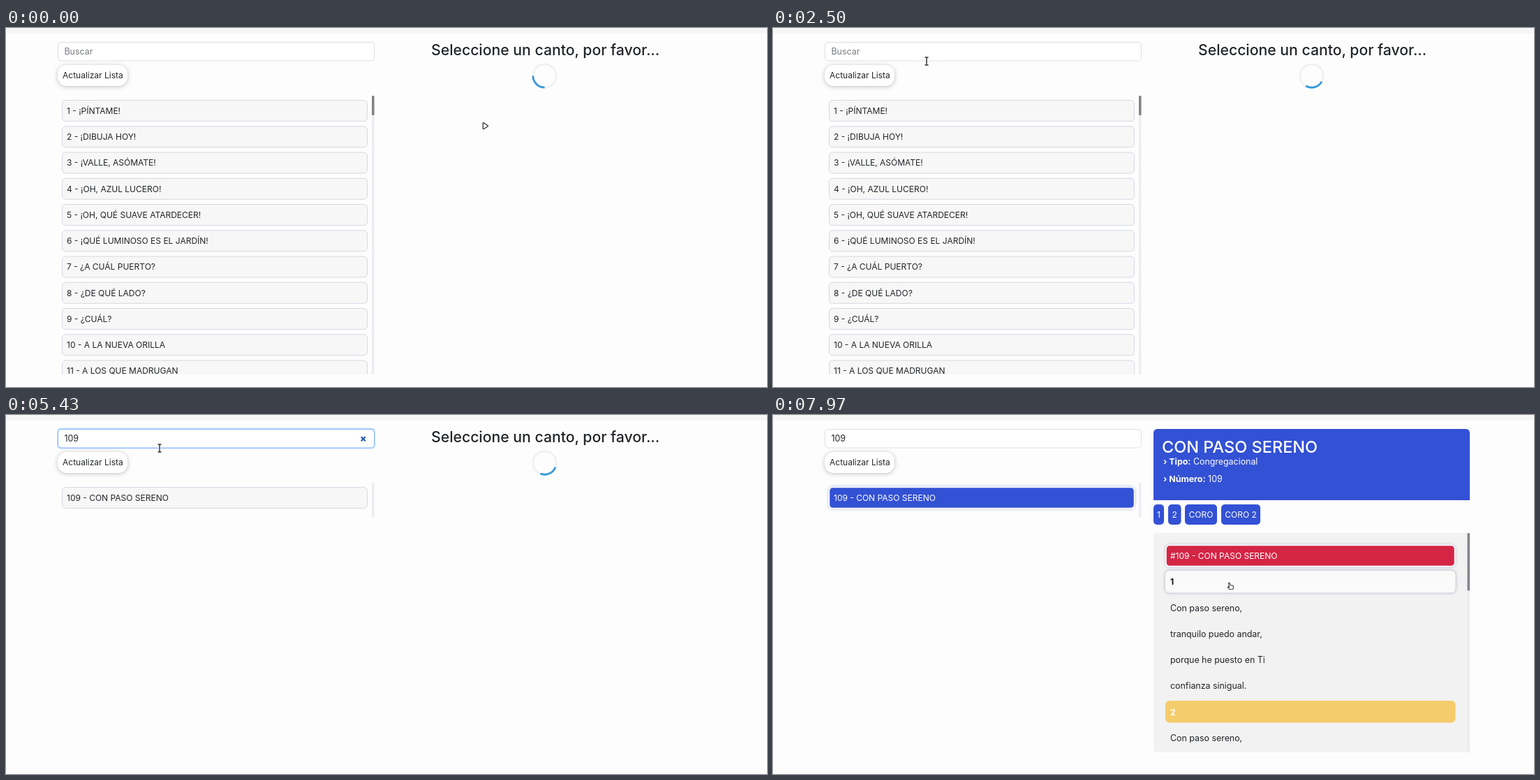
An HTML page for the animation above (8 s loop, 1090 px wide and 514 px high).

```html
<!DOCTYPE html>
<html lang="es">
<head>
<meta charset="utf-8">
<title>Cantos</title>
<style>
  html, body { margin: 0; width: 100%; height: 100%; overflow: hidden; background: #fdfdfd; }
  svg { display: block; width: 1090px; height: 514px; }
  text { font-family: Inter, "Open Sans", sans-serif; font-size: 12px; fill: #212529; white-space: pre; }
  .body { font-size: 12.4px; }
  .white { fill: #fff; }
  .bold { font-weight: 700; }
  .blue { fill: #3351d4; }
  .item { fill: #f7f7f7; stroke: #d6d8e4; }
  .pill { filter: drop-shadow(0 1px 3px rgba(0, 0, 0, .25)); }
  .soft { filter: drop-shadow(0 0 2px rgba(60, 70, 150, .3)); }
</style>
</head>
<body>
<svg viewBox="0 0 1090 514">
  <defs>
    <clipPath id="listClip"><rect id="listBox" x="70" y="97" width="452" height="399"/></clipPath>
    <clipPath id="songClip"><rect x="545" y="169" width="453" height="314"/></clipPath>
  </defs>
  <rect width="1090" height="514" fill="#fdfdfd"/>
  <rect width="1090" height="8" fill="#f6f6f7"/>

  <rect id="glow" x="73" y="18.5" width="456" height="30" rx="5.5" fill="#c2dcfb"/>
  <rect id="field" x="74.5" y="20.5" width="453" height="26.5" rx="4.5" fill="#fff"/>
  <text id="query" class="body" x="83.5" y="38"></text>
  <path id="caret" d="M84.5 27V41" stroke="#333" stroke-width="1"/>
  <path id="clear" d="M508.7 31.2l6 6m0-6l-6 6" stroke="#1b57a3" stroke-width="2"/>

  <rect class="pill" x="74" y="53" width="100" height="30" rx="13" fill="#fff"/>
  <text x="81" y="72.3">Actualizar Lista</text>

  <g id="list" clip-path="url(#listClip)"></g>
  <rect id="track" x="524" y="97" width="3.5" height="399" fill="#ededf3"/>
  <rect id="thumb" x="524" y="97" width="3.5" height="28" rx="1" fill="#828282"/>

  <g id="wait">
    <text x="609" y="39" style="font-size:21.2px;font-weight:500">Seleccione un canto, por favor...</text>
    <circle cx="771.5" cy="68.5" r="16.7" fill="none" stroke="#f1f1f2" stroke-width="2.8"/>
    <path id="arc" d="M759.7 56.7A16.7 16.7 0 0 1 783.3 56.7" fill="none" stroke="#3498db" stroke-width="2.8"/>
  </g>

  <g id="song"></g>

  <g id="cursor">
    <path id="arrow" d="M1.2 1.2L1.2 9Q1.3 10 2.3 9.5L8 6Q8.8 5.3 8 4.7L2.5 .8Q1.3 .2 1.2 1.2Z" fill="#fff" stroke="#333" stroke-width="1.3" stroke-linejoin="round"/>
    <g id="beam" fill="none">
      <path d="M-2.5 -5H2.5M0 -5V6M-2.5 6H2.5" stroke="#fff" stroke-width="3.4"/>
      <path d="M-2.5 -5H2.5M0 -5V6M-2.5 6H2.5" stroke="#333" stroke-width="1.5"/>
    </g>
    <path id="hand" d="M-2.6 -4.3Q-1.7 -5.6 -.8 -4.3L.1 -1.2L3.2 -.7Q4.6 -.3 4.5 1L4 4.5L-.6 4.8L-3.6 1.9Q-3.9 .7 -2.5 .9L-1.4 1.5Z" fill="#fff" stroke="#333" stroke-width="1.1" stroke-linejoin="round"/>
  </g>
</svg>
<script>
const LOOP = 8000, PITCH = 37.25, VIEW = 399, TOTAL = 152;
const FOCUS = 2600, CLICK = 6900, OPEN = 6970;
const KEYS = [[4400, '1'], [4650, '10'], [4900, '109']];
const SONG = 'CON PASO SERENO';
const TITLES = ['¡PÍNTAME!', '¡DIBUJA HOY!', '¡VALLE, ASÓMATE!', '¡OH, AZUL LUCERO!',
  '¡OH, QUÉ SUAVE ATARDECER!', '¡QUÉ LUMINOSO ES EL JARDÍN!', '¿A CUÁL PUERTO?',
  '¿DE QUÉ LADO?', '¿CUÁL?', 'A LA NUEVA ORILLA', 'A LOS QUE MADRUGAN'];
const PLACES = ['AL SENDERO', 'A LA COLINA', 'AL MOLINO', 'A LA RIBERA', 'AL PINAR'];
const TONES = ['SERENO DE AYER', 'QUE VUELVE', 'DE OTOÑO'];

// time, x, y of the pointer's hot spot
const PATH = [[0, 682, 135], [300, 682, 135], [1300, 549, 153], [1650, 549, 153], [2000, 536, 85],
  [2450, 220, 47], [6050, 220, 47], [6450, 246, 95], [6500, 246, 96], [6700, 257, 125],
  [7100, 257, 125], [7530, 640, 148], [7700, 648, 190], [7830, 654, 230], [7970, 655, 245], [LOOP, 655, 245]];

const $ = id => document.getElementById(id);
const show = (id, on) => $(id).setAttribute('visibility', on ? 'visible' : 'hidden');
const set = (id, attrs) => { for (const k in attrs) $(id).setAttribute(k, attrs[k]); };
const clamp = x => Math.max(0, Math.min(1, x));
const ease = (t, start, dur) => 1 - Math.pow(1 - clamp((t - start) / dur), 2.4);
const mix = (a, b, p) => `rgb(${a.map((v, i) => Math.round(v + (b[i] - v) * p))})`;

const rect = (x, y, w, h, r, more) => `<rect x="${x}" y="${y}" width="${w}" height="${h}" rx="${r}" ${more}/>`;
const text = (x, y, s, more = '') => `<text x="${x}" y="${y}" ${more}>${s}</text>`;

function title(n) {
  if (n <= TITLES.length) return TITLES[n - 1];
  return n === 109 ? SONG : PLACES[n % 5] + ' ' + TONES[n % 3];
}

let shownQuery = null;
function drawList(query) {
  if (query === shownQuery) return;
  shownQuery = query;
  const found = [];
  for (let n = 1; n <= TOTAL; n++) if (String(n).includes(query)) found.push(n);
  const full = found.length * PITCH + 12, height = Math.min(VIEW, full);
  $('list').innerHTML = found.slice(0, 11).map((n, i) => {
    const y = 103.5 + i * PITCH, id = i ? '' : 'id="first"';
    return rect(80.5, y, 437, 30, 5, `class="item" ${id}`) +
      text(87, y + 19.3, `${n} - ${title(n)}`, i ? '' : 'id="firstText"');
  }).join('');
  set('listBox', { height });
  set('track', { height });
  set('thumb', { height: VIEW * VIEW / full });
  show('thumb', full > VIEW);
}

function buildSong() {
  const chips = [[545, 15, '1'], [566, 18.5, '2'], [590, 46, 'CORO'], [642, 56, 'CORO 2']];
  const verse = ['Con paso sereno,', 'tranquilo puedo andar,', 'porque he puesto en Ti', 'confianza sinigual.'];
  const rowY = i => 206.1 + i * PITCH;
  const fact = (y, label, value) => text(559, y, `<tspan class="bold">› ${label}:</tspan> ${value}`, 'class="body white"');
  let s = '<path class="blue" d="M545 122V26Q545 20 551 20H992Q998 20 998 26V122Z"/>' +
    text(557, 53.8, SONG, 'class="white" style="font-size:23.5px;font-weight:500"') +
    fact(70.6, 'Tipo', 'Congregacional') + fact(96, 'Número', '109');
  for (const [x, w, label] of chips)
    s += rect(x, 128, w, 29, 5, 'class="blue"') +
      text(x + w / 2, 146.8, label, 'class="white" text-anchor="middle"');
  s += '<g clip-path="url(#songClip)">' + rect(545, 169, 460, 314, 5, 'fill="#f2f2f2"') +
    rect(994.5, 169, 3.5, 314, 0, 'fill="#ebebf0"') + rect(994.5, 169, 3.5, 82.5, 1, 'fill="#85838c"') +
    rect(563, 186.5, 413.5, 30, 5, 'id="head" class="soft" stroke="#fff" stroke-width="1.5"') +
    text(569, rowY(0), '#109 - ' + SONG, 'id="headText"') +
    rect(562, 223, 415.5, 31.5, 6, 'id="one"') + text(569, rowY(1), '1', 'id="oneText" class="bold"');
  verse.forEach((line, i) => { s += text(569, rowY(2 + i), line, 'class="body"'); });
  s += rect(562, 409, 415.5, 31.5, 6, 'fill="#f4cc6c"') + text(569, rowY(6), '2', 'class="bold white"') +
    text(569, rowY(7), verse[0], 'class="body"') + '</g>';
  $('song').innerHTML = s;
}

function pointer(t) {
  let i = 1;
  while (i < PATH.length - 1 && t > PATH[i][0]) i++;
  const a = PATH[i - 1], b = PATH[i];
  const u = clamp((t - a[0]) / (b[0] - a[0])), p = u * u * (3 - 2 * u);
  return [a[1] + (b[1] - a[1]) * p, a[2] + (b[2] - a[2]) * p];
}

function drawPointer(t) {
  const [x, y] = pointer(t);
  const within = (l, r, top, bottom) => x >= l && x <= r && y >= top && y <= bottom;
  const beam = within(74, 528, 20, 48);
  const hand = within(80, 518, 103, 134) ||
    t >= OPEN && (within(545, 698, 128, 157) || within(562, 978, 187, 255));
  set('cursor', { transform: `translate(${x.toFixed(2)} ${y.toFixed(2)})` });
  show('beam', beam);
  show('hand', hand);
  show('arrow', !beam && !hand);
}

function drawField(t, query) {
  const on = t < CLICK ? ease(t, FOCUS, 150) : 1 - ease(t, CLICK, 150);
  set('glow', { opacity: on });
  set('field', { stroke: mix([220, 223, 230], [134, 183, 254], on) });
  $('query').textContent = query || 'Buscar';
  $('query').style.fill = query ? '#212529' : '#777c81';
  const last = KEYS.reduce((at, k) => t >= k[0] ? k[0] : at, FOCUS);
  const active = t >= FOCUS && t < CLICK;
  show('caret', active && (t - last) % 1000 < 500);
  set('caret', { transform: `translate(${query.length * 6.6} 0)` });
  show('clear', active && query);
}

function drawFirst(t) {
  const first = $('first').style, label = $('firstText').style;
  const hover = ease(t, 6590, 200), pick = ease(t, CLICK, 250);
  first.fill = pick ? mix([252, 252, 252], [51, 81, 212], pick) : mix([247, 247, 247], [252, 252, 252], hover);
  first.stroke = mix([214, 216, 228], [255, 255, 255], pick);
  first.strokeWidth = 1 + pick * .5;
  first.filter = hover ? `drop-shadow(0 0 2px rgba(50,85,190,${(.4 * hover).toFixed(2)}))` : 'none';
  label.fill = mix([33, 37, 41], [255, 255, 255], pick);
}

function drawSong(t) {
  const p = ease(t, OPEN - 10, 200), h = ease(t, 7820, 145);
  const one = $('one').style;
  $('head').style.fill = mix([248, 240, 240], [212, 37, 69], p);
  $('headText').style.fill = mix([180, 120, 130], [255, 255, 255], p * p);
  one.fill = mix([244, 204, 108], [250, 250, 250], h);
  one.filter = h ? `drop-shadow(0 0 2px rgba(50,50,110,${(.4 * h).toFixed(2)}))` : 'none';
  $('oneText').style.fill = mix([255, 255, 255], [15, 15, 20], h);
}

function draw(t) {
  const query = KEYS.reduce((q, k) => t >= k[0] ? k[1] : q, '');
  drawList(query);
  drawField(t, query);
  drawFirst(t);
  drawSong(t);
  set('arc', { transform: `rotate(${(225 + t * .12) % 360} 771.5 68.5)` });
  $('wait').style.display = t < OPEN ? '' : 'none';
  $('song').style.display = t < OPEN ? 'none' : '';
  drawPointer(t);
}

buildSong();
draw(0);
const begin = performance.now();
(function tick() {
  draw((performance.now() - begin) % LOOP);
  requestAnimationFrame(tick);
})();
</script>
</body>
</html>
```
